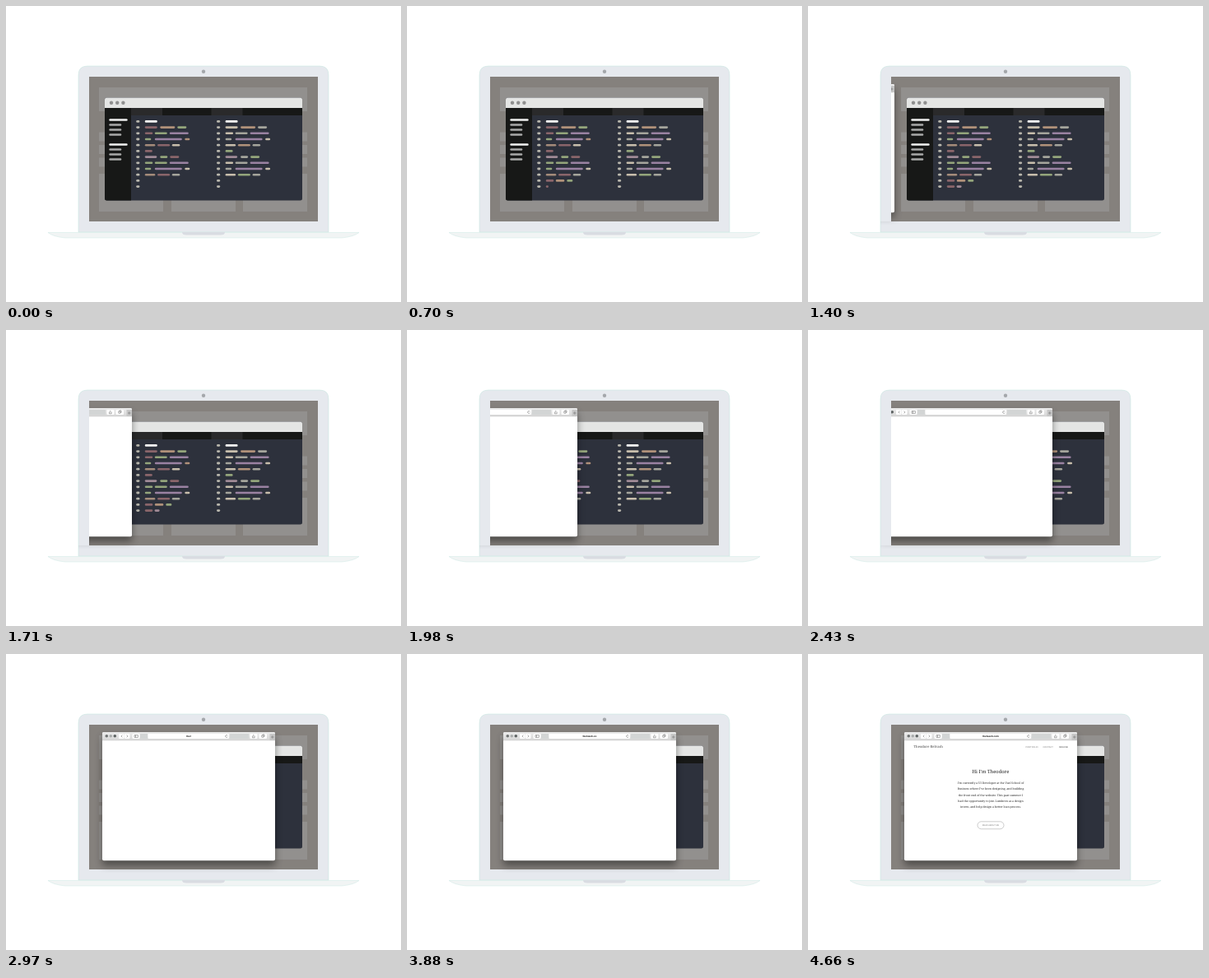
Recreate the animation shown at these times as an HTML page. Size 480 px wide and 360 px high, loop 5.49 s.

```html
<!DOCTYPE html>
<html lang="en">
<head>
<meta charset="utf-8">
<title>Laptop with code editor and browser</title>
<style>
html, body { margin: 0; width: 100%; height: 100%; overflow: hidden; background: #fff; }
svg { display: block; width: 100vw; height: 100vh; }
text { text-rendering: geometricPrecision; }
.serif { font-family: "Noto Serif", "Liberation Serif", serif; }
.sans { font-family: "Liberation Sans", Arial, sans-serif; }
.mid { text-anchor: middle; }
</style>
</head>
<body>
<svg viewBox="0 0 480 360">
  <defs>
    <clipPath id="screenClip"><rect x="101" y="86" width="278" height="176"/></clipPath>
    <clipPath id="shadeClip"><path d="M101 86H379V262H392V275H88V262H101Z"/></clipPath>
    <filter id="blur" x="-20%" y="-20%" width="140%" height="140%"><feGaussianBlur stdDeviation="5"/></filter>
    <linearGradient id="bar" x2="0" y2="1">
      <stop stop-color="#ececec"/><stop offset="1" stop-color="#d6d6d6"/>
    </linearGradient>
  </defs>

  <!-- laptop -->
  <path d="M88 275V84Q88 73 99 73H381Q392 73 392 84V275Z" fill="#e6e9ee" stroke="#c3e4dd" stroke-width=".5"/>
  <circle cx="240" cy="79.8" r="2.2" fill="#a4a7ab"/>
  <rect x="101" y="86" width="278" height="176" fill="#85817d"/>
  <g id="desk" fill="#92908e"></g>
  <path d="M51 275.5H429Q423 280.5 408 282H72Q57 280.5 51 275.5Z" fill="#f1f4f4" stroke="#c3e4dd" stroke-width=".4"/>
  <path d="M214 275H266Q266 278.5 261 278.5H219Q214 278.5 214 275Z" fill="#d9dce2"/>

  <!-- editor -->
  <rect x="120" y="111.5" width="240" height="125" rx="2.5" fill="#2d313c"/>
  <path d="M120 124H360V133H152V236.5H122.5Q120 236.5 120 234Z" fill="#171817"/>
  <path d="M152 124H190V133H152ZM249.5 124H287.5V133H249.5Z" fill="#2a2a2b"/>
  <path d="M120 124V114Q120 111.5 122.5 111.5H357.5Q360 111.5 360 114V124Z" fill="#e4e5e4"/>
  <g id="lights" fill="#8f8f8f"></g>
  <g id="side"></g>
  <g id="code"></g>

  <!-- browser -->
  <g clip-path="url(#shadeClip)">
    <rect id="shade" x="117" y="101" width="210" height="156" fill="#000" opacity=".42" filter="url(#blur)"/>
  </g>
  <g clip-path="url(#screenClip)">
    <g id="browser">
      <rect x="117" y="95" width="210" height="156.3" rx="1.8" fill="#fff"/>
      <path d="M117 105V97Q117 95 119 95H325Q327 95 327 97V105Z" fill="url(#bar)"/>
      <path d="M117 105H327" stroke="#c4c4c4" stroke-width=".5"/>
      <path d="M163 97H172V103H163ZM272 97H295V103H272Z" fill="#d3d5d5"/>
      <rect x="320.5" y="97" width="6.5" height="8" fill="#c6c6c6"/>
      <g id="buttons" fill="#fff"></g>
      <circle cx="122.3" cy="99.8" r="1.8" fill="#6f7272"/>
      <circle cx="127.3" cy="99.8" r="1.8" fill="#a9acac"/>
      <circle cx="132.3" cy="99.8" r="1.8" fill="#5f6464"/>
      <g fill="none" stroke="#777" stroke-width=".6">
        <path d="M141.3 98.6L140 100L141.3 101.4M146.7 98.6L148 100L146.7 101.4"/>
        <path d="M156 98.6H160.4V101.4H156ZM157.5 98.6V101.4"/>
        <path d="M269.2 99.2A1.4 1.4 0 1 0 269.3 100.6"/>
        <path d="M299.4 99.6V101.8H302.2V99.6M300.8 100.6V97.8"/>
        <path d="M310.8 98.8H313V101.2H310.8ZM311.8 98.8V98H314V100.4H313"/>
        <path d="M322 101H325.6M323.8 99.2V102.8"/>
      </g>
      <text id="url" class="sans mid" x="222" y="101" font-size="3.1" font-weight="bold" fill="#111"></text>
      <g id="page">
        <text class="serif" x="128.5" y="114" font-size="4.15" fill="#444">Theodore Kelvash</text>
        <g class="sans" font-size="2.6" fill="#777">
          <text x="264.5" y="113.6">PORTFOLIO</text>
          <text x="285.5" y="113.6">CONTACT</text>
          <text x="305" y="113.6" fill="#444">RESUME</text>
        </g>
        <text class="serif mid" x="222" y="145" font-size="5.8" fill="#222">Hi I’m Theodore</text>
        <g id="bio" class="serif mid" font-size="3.45" fill="#222"></g>
        <rect x="206" y="203.8" width="32" height="9" rx="4.5" fill="#fff" stroke="#999" stroke-width=".5"/>
        <text class="sans mid" x="222" y="209.2" font-size="2.5" fill="#777">READ ABOUT ME</text>
      </g>
    </g>
  </g>
</svg>
<script>
const LOOP = 5490;
const URL_TEXT = "tkelvash.com";
const $ = id => document.getElementById(id);

function add(parent, tag, attrs) {
  const el = document.createElementNS("http://www.w3.org/2000/svg", tag);
  for (const key in attrs) el.setAttribute(key, attrs[key]);
  return parent.appendChild(el);
}
const rect = (parent, x, y, width, height, rx = 0) => add(parent, "rect", { x, y, width, height, rx });

function pill(parent, x, y, width, fill, height = 2.6) {
  const el = rect(parent, x, y - height / 2, width, height, height / 2);
  el.setAttribute("fill", fill);
  return el;
}

// Desktop panels behind the editor
rect($("desk"), 113, 99, 253, 29);
for (const y of [153.5, 169, 184.5]) rect($("desk"), 113, y, 253, 11);
for (const x of [113, 201, 288]) rect($("desk"), x, 204, 78, 46);

for (const cx of [128, 135.2, 142.4]) add($("lights"), "circle", { cx, cy: 117.8, r: 2.2 });
for (const y of [138.5, 168.5]) {
  pill($("side"), 125.3, y, 22.4, "#f1f1f1");
  for (const dy of [6, 12, 18]) pill($("side"), 125.3, y + dy, 15, "#a9a9a9");
}
for (const [x, w] of [[137, 6.5], [144, 6.5], [153.5, 9], [172.5, 98.5], [296.5, 9], [307.5, 9.5]])
  rect($("buttons"), x, 97, w, 6, 1);

// Code rows: [start, width] of each bar, then a colour letter per bar for both columns
const COLORS = {
  w: "#f6f6f4", c: "#c8beac", t: "#b0917a", g: "#94a57b", p: "#9a82a2",
  r: "#8a656a", b: "#a48b7a", s: "#a5a59c", m: "#a08a96"
};
const SHORT = [[0, 9.5], [12, 15], [30, 23]];
const CALL = [[0, 7.5], [12, 33], [48.5, 6]];
const ARGS = [[0, 12.5], [15.3, 15], [33, 9.5]];
const ROWS = [
  [[[0, 15]], "w", "w"],
  [[[0, 15], [18.5, 18], [39.5, 11]], "rtg", "cts"],
  [SHORT, "rgp", "csp"],
  [CALL, "gpt", "spc"],
  [ARGS, "brc", "cts"],
  [[[0, 9]], "r", "g"],
  [[[0, 14.5], [18.5, 9], [30.5, 11]], "mgr", "msg"],
  [SHORT, "ggp", "csp"],
  [CALL, "gpc", "spc"],
  [ARGS, "brs", "cgs"],
  [[[0, 9.5], [12, 10.5], [25.5, 7]], "rtg", ""],
  [[[0, 9.5], [11.8, 6]], "rm", ""]
];
const typed = {};
ROWS.forEach(([bars, ...columns], row) => {
  const y = 140.4 + row * 7.2;
  columns.forEach((letters, col) => {
    const x = 168.8 + col * 97.8;
    pill($("code"), x - 10.6, y, 4.2, "#b9b7ad", 2.8);
    const pills = [...letters].map((c, i) => pill($("code"), x + bars[i][0], y, bars[i][1], COLORS[c]));
    if (row > 9 && !col) typed[row] = pills.map((el, i) => ({ el, width: bars[i][1] }));
  });
});

[
  "I’m currently a UI Developer at the Vael School of",
  "Business where I’ve been designing, and building",
  "the front end of the website. This past summer I",
  "had the opportunity to join Lumbren as a design",
  "intern, and help design a better loan process."
].forEach((line, i) => {
  add($("bio"), "text", { x: 222, y: 158.2 + i * 7.2 }).textContent = line;
});

const clamp = (v, lo, hi) => Math.min(hi, Math.max(lo, v));
const stepsDone = (t, start, gap, max) => clamp(Math.floor((t - start) / gap) + 1, 0, max);

function typeRow(row, done) {
  const bars = typed[row];
  bars.forEach(({ el, width }, i) => {
    el.setAttribute("width", width * clamp(done * bars.length / 6 - i, 0, 1));
  });
}

function draw(t) {
  typeRow(10, stepsDone(t, 100, 100, 6));
  typeRow(11, stepsDone(t, 700, 100, 6));

  // The browser slides in 6 px per step: two slow steps, then one every 30 ms
  const slide = stepsDone(t, 1300, 100, 2) + stepsDone(t, 1500, 30, 37);
  const move = `translate(${6 * slide - 234} 0)`;
  for (const id of ["browser", "shade"]) {
    $(id).setAttribute("transform", move);
    $(id).style.display = slide ? "" : "none";
  }

  const chars = stepsDone(t, 2610, 100, 1) + stepsDone(t, 2710, 130, URL_TEXT.length - 1);
  $("url").textContent = URL_TEXT.slice(0, chars);
  $("page").setAttribute("opacity", stepsDone(t, 4140, 130, 5) / 5);
}

const start = performance.now();
function tick() {
  draw((performance.now() - start) % LOOP);
  requestAnimationFrame(tick);
}
tick();
</script>
</body>
</html>
```
